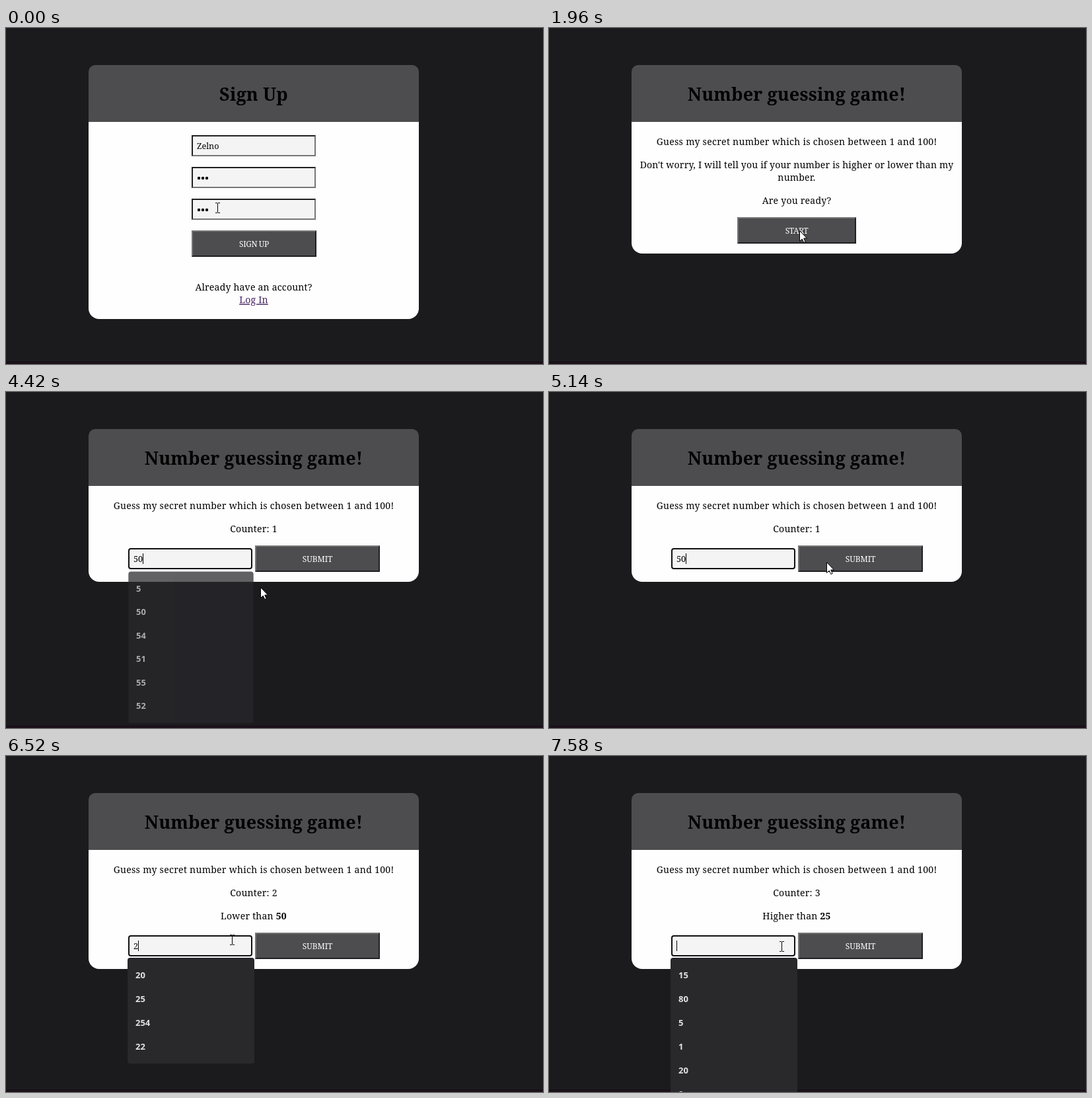
An HTML page that plays this animation: 813 by 508 pixels, repeating every 8 s.

```html
<!DOCTYPE html>
<html lang="en">
<head>
<meta charset="utf-8">
<title>Number guessing game</title>
<style>
html, body { margin: 0; width: 100%; height: 100%; overflow: hidden; background: #1b1b1d; }
svg { display: block; width: 813px; height: 508px; }
text { font: 14px "Noto Serif", serif; letter-spacing: .25px; fill: #000; }
.mid { text-anchor: middle; }
.title { font-size: 27px; font-weight: 700; letter-spacing: .1px; }
.wide { letter-spacing: .31px; }
.snug { letter-spacing: .21px; }
.bold { font-weight: 700; }
.link { fill: #452363; text-decoration: underline; }
.label { font-size: 12px; font-weight: 500; letter-spacing: -.4px; fill: #fff; }
.submit { letter-spacing: -.1px; }
.value { font-size: 12.6px; letter-spacing: 0; }
.option { font: 700 13px "Open Sans", sans-serif; letter-spacing: 0; fill: #e4e4e5; }
</style>
</head>
<body>
<svg id="stage" viewBox="0 0 813 508"></svg>
<script>
const LOOP = 8000, MID = 375;
const DARK = '#202022', LIGHT = '#767676', GREY = '#4d4d4f', FIELD = '#f4f4f4';
const stage = document.getElementById('stage');

const RECENT = [15, 80, 5, 1, 20, 8], FIVES = [5, 50, 54, 51, 55, 52];
const TWOS = [20, 25, 254, 22], MATCHES = [25, 254];

const beam = (x, y) => ({ cursor: 'beam', x, y });
const arrow = (x, y) => ({ cursor: 'arrow', x, y });
const popup = (list, alpha = 1) => ({ list, alpha });
const closed = { list: null };
const focus = { focused: true, caret: true, ...popup(RECENT) };
const blur = { focused: false, caret: false };

// Each entry changes part of the state at the given time.
const timeline = [
  [0, { page: 'signup', value: '', pressed: false, ...blur, ...closed, ...beam(317, 264) }],
  [150, beam(332, 276)],
  [270, arrow(354, 310)],
  [390, arrow(365, 328)],
  [790, { pressed: true }],
  [940, { pressed: false }],
  [1380, { page: 'intro' }],
  [1810, arrow(373, 316)],
  [1960, arrow(379, 306)],
  [2920, { page: 'game', count: 1, hint: null }],
  [3040, arrow(374, 288)],
  [3160, beam(352, 252)],
  [3310, beam(339, 240)],
  [3430, focus],
  [3710, beam(342, 240)],
  [4020, { caret: false }],
  [4300, { value: '5', caret: true, ...popup(FIVES) }],
  [4420, { value: '50', ...popup(FIVES, .73), ...arrow(385, 295) }],
  [4540, { ...closed, ...arrow(397, 280) }],
  [4660, arrow(410, 267)],
  [4780, arrow(420, 257)],
  [4950, { caret: false }],
  [5140, { caret: true }],
  [5390, { count: 2, hint: ['Lower', 50], value: '', ...blur }],
  [5540, arrow(390, 266)],
  [5690, beam(348, 272)],
  [5840, { ...focus, ...beam(339, 270) }],
  [6370, { caret: false }],
  [6490, { value: '2', caret: true, ...popup(TWOS) }],
  [6610, { value: '25', ...popup(MATCHES) }],
  [6790, arrow(404, 290)],
  [6940, { ...blur, ...popup(MATCHES, .2), ...arrow(422, 292) }],
  [7090, { pressed: true, ...closed }],
  [7210, { pressed: false, count: 3, hint: ['Higher', 25], value: '', ...arrow(390, 288) }],
  [7330, beam(349, 280)],
  [7580, focus]
];

const states = [];
timeline.reduce((prev, [, patch]) => {
  const next = { ...prev, ...patch };
  states.push(next);
  return next;
}, {});

const rect = (x, y, w, h, fill, more = '') =>
  `<rect x="${x}" y="${y}" width="${w}" height="${h}" fill="${fill}" ${more}/>`;
const text = (x, y, str, cls = '') => `<text x="${x}" y="${y}" class="${cls}">${str}</text>`;
const line = (y, str, cls = '') => text(MID, y, str, 'mid ' + cls);

function bevel(x, y, w, h, fill, topLeft, bottomRight) {
  return rect(x, y, w, h, bottomRight) +
    `<path d="M${x} ${y}h${w}l-2 2H${x + 2}V${y + h - 2}l-2 2z" fill="${topLeft}"/>` +
    rect(x + 2, y + 2, w - 4, h - 4, fill);
}

function button(x, y, w, label, pressed, cls = '') {
  const edge = pressed ? [DARK, LIGHT] : [LIGHT, DARK];
  return bevel(x, y, w, 40, GREY, ...edge) + text(x + w / 2, y + 25, label, 'mid label ' + cls);
}

function field(x, y, value, focused, caret) {
  const box = focused
    ? rect(x + 1, y + 1, 186, 30, FIELD, 'rx="3" stroke="#101012" stroke-width="2"')
    : bevel(x, y, 188, 32, FIELD, DARK, LIGHT);
  const end = x + 8 + value.length * 7;
  return box + text(x + 8, y + 21, value, 'value') + (caret ? rect(end, y + 8, 1, 16, '#000') : '');
}

function card(bottom, title) {
  return rect(125, 100, 500, bottom - 100, '#fefefe', 'rx="16"') +
    `<path d="M125 142V66a10 10 0 0 1 10-10H615a10 10 0 0 1 10 10V142z" fill="${GREY}"/>` +
    line(110, title, 'title');
}

function dropdown(top, { list, alpha }) {
  const h = 16 + 36 * list.length, cx = 280, cy = top + h / 2;
  const rows = list.map((n, i) => text(196, top + 30.5 + 36 * i, n, 'option')).join('');
  return `<g opacity="${alpha}" transform="translate(${cx} ${cy}) scale(${.95 + .05 * alpha}) translate(${-cx} ${-cy})">` +
    rect(184, top, 192, h, '#29292c', 'rx="4"') + rows + '</g>';
}

const dots = y => [292, 298, 304].map(x => `<circle cx="${x}" cy="${y}" r="2.2"/>`).join('');
const question = line(177, 'Guess my secret number which is chosen between 1 and 100!', 'wide');

const pages = {
  signup: s => card(440, 'Sign Up') +
    field(281, 162, 'Zelno') +
    field(281, 210, '') + dots(227) +
    field(281, 258, '') + dots(275) +
    button(281, 306, 189, 'SIGN UP', s.pressed) +
    line(397, 'Already have an account?', 'snug') +
    line(416, 'Log In', 'link'),

  intro: s => card(341, 'Number guessing game!') + question +
    line(212, "Don't worry, I will tell you if your number is higher or lower than my", 'snug') +
    line(231, 'number.') +
    line(266, 'Are you ready?') +
    button(285, 286, 180, 'START', s.pressed),

  game(s) {
    const y = s.hint ? 267 : 232;
    return card(y + 55, 'Number guessing game!') + question +
      line(212, 'Counter: ' + s.count) +
      (s.hint ? line(247, `${s.hint[0]} than <tspan class="bold">${s.hint[1]}</tspan>`) : '') +
      field(185, y + 4, s.value, s.focused, s.caret) +
      button(377, y, 189, 'SUBMIT', s.pressed, 'submit') +
      (s.list ? dropdown(y + 38, s) : '');
  }
};

const cursors = {
  arrow: '<path d="M.5 .5V16.5L4.2 13L6.8 18.5L9.2 17.4L6.7 12H11.5z" fill="#fff" stroke="#000"/>',
  beam: '<path d="M0 .5H3M4 .5H7M3.5 1V15M0 15.5H3M4 15.5H7" fill="none" stroke="#000"/>'
};

function draw(s) {
  stage.innerHTML = rect(0, 0, 813, 508, '#1b1b1d') + rect(0, 504, 813, 4, '#1a111a') +
    pages[s.page](s) +
    `<g transform="translate(${s.x} ${s.y})">${cursors[s.cursor]}</g>`;
}

let shown = -1;
function tick() {
  const t = performance.now() % LOOP;
  let i = timeline.length - 1;
  while (timeline[i][0] > t) i--;
  if (i !== shown) draw(states[shown = i]);
  requestAnimationFrame(tick);
}
tick();
</script>
</body>
</html>
```
